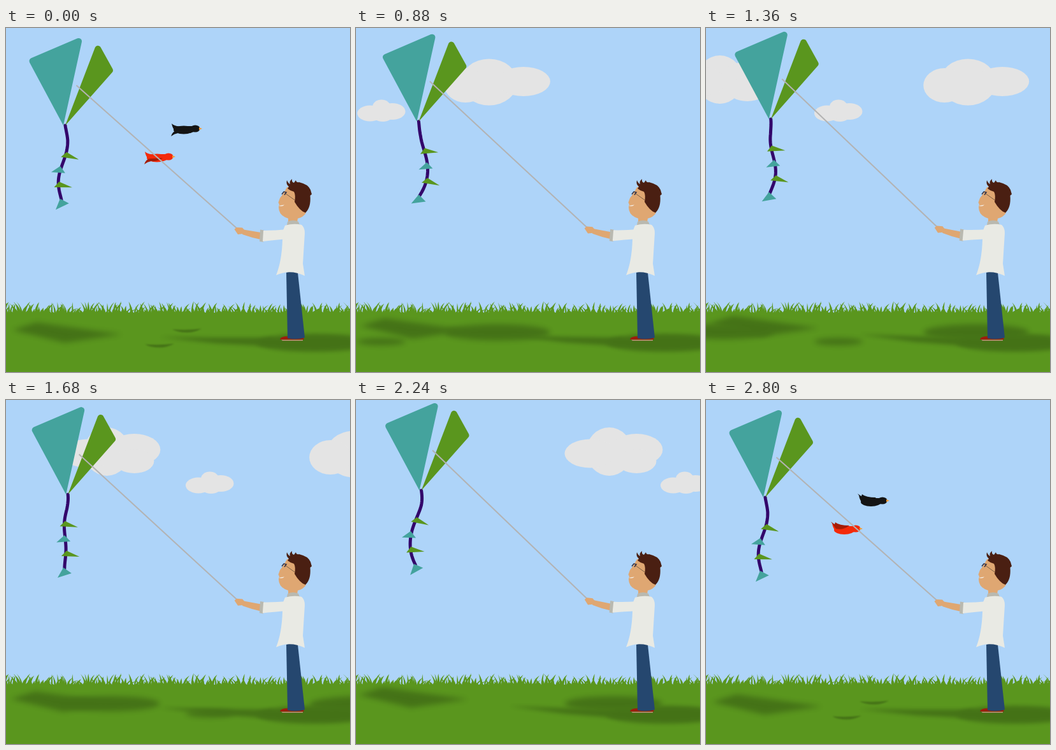
Recreate the animation shown at these times as an HTML page with a canvas. Size 540 px wide and 540 px high, loop 2880 ms.

```html
<!DOCTYPE html>
<html lang="en">
<head>
<meta charset="utf-8">
<title>Kite flying</title>
<style>
html, body { margin: 0; width: 100%; height: 100%; overflow: hidden; background: #aed4f9; }
canvas { display: block; width: 540px; height: 540px; }
</style>
</head>
<body>
<canvas id="stage" width="540" height="540"></canvas>
<script>
const SIZE = 540, LOOP = 2880, STEP = 80, CYCLE = 2800, BEAT = 560;
const SKY = '#aed4f9', GREEN = '#5a961e', TEAL = '#44a39d', CLOUD = '#e4e4e4';
const SKIN = '#dfa772', HAIR = '#4a1f12', SHIRT = '#e9eae4', CUFF = '#b9b9b0';

const screen = document.getElementById('stage').getContext('2d');
const layer = document.createElement('canvas');
layer.width = layer.height = SIZE;
const shade = layer.getContext('2d');
let ctx = screen;

function fillPath(d, color) {
  ctx.fillStyle = color;
  ctx.fill(new Path2D(d));
}

function line(d, color, width) {
  ctx.strokeStyle = color;
  ctx.lineWidth = width;
  ctx.stroke(new Path2D(d));
}

function oval(x, y, rx, ry, color) {
  ctx.fillStyle = color;
  ctx.beginPath();
  ctx.ellipse(x, y, rx, ry, 0, 0, 2 * Math.PI);
  ctx.fill();
}

function at(x, y, angle, draw) {
  ctx.save();
  ctx.translate(x, y);
  ctx.rotate(angle);
  draw();
  ctx.restore();
}

const smooth = f => f * f * (3 - 2 * f);

// Height of the kite on each beat; it drifts sideways in proportion
const RISE = [0, 5, -13.5, -4.8, -11, 0];

function drift(t) {
  const p = t % CYCLE / BEAT, i = Math.floor(p);
  const dy = RISE[i] + (RISE[i + 1] - RISE[i]) * smooth(p - i);
  return [-.87 * dy, dy];
}

// A wave runs down the tail: s is the depth from 0 to 1
function sway(s, t) {
  const phase = 2 * Math.PI * t / CYCLE - 2.15 * Math.sin(2 * s);
  return (3 - 7 * s) * Math.min(1, 5 * s) + 16 * Math.sin(2.8 * s ** 1.6) * Math.cos(phase);
}

function tail(t) {
  const node = i => ({ x: sway(i / 5, t), y: 23.3 * i });
  ctx.beginPath();
  for (let i = 0; i <= 5; i += .125) ctx.lineTo(node(i).x, node(i).y);
  ctx.strokeStyle = '#33066b';
  ctx.lineWidth = 5;
  ctx.lineCap = ctx.lineJoin = 'round';
  ctx.stroke();
  for (let i = 2; i <= 5; i++) {
    const { x, y } = node(i), a = node(i - 1), b = node(Math.min(5, i + 1));
    const tilt = .5 * Math.atan2(a.x - b.x, b.y - a.y);
    if (i % 2) {
      const end = i === 5;
      at(x, y + (end ? 1 : 0), tilt - (end ? .3 : 0), () =>
        fillPath(end ? 'M-14 10L-1 -3L9 9Z' : 'M-14 5L-1 -6L8 4Z', TEAL));
    } else {
      at(x, y, tilt + .2, () => fillPath('M-6 5L0 -5L22 0Z', GREEN));
    }
  }
}

function sail(x1, y1, x2, y2, x3, y3, color) {
  ctx.beginPath();
  ctx.moveTo(x3, y3);
  ctx.arcTo(x1, y1, x2, y2, 5);
  ctx.arcTo(x2, y2, x3, y3, 5);
  ctx.fillStyle = color;
  ctx.fill();
}

function kite(t, dx, dy) {
  at(dx, dy, 0, () => {
    at(93, 153, 0, () => tail(t));
    sail(34.5, 49.5, 121, 12.5, 90, 153, TEAL);
    sail(143.5, 21, 169, 67, 93, 153, GREEN);
  });
  line(`M${110.5 + dx} ${90 + dy}L363 ${315 + dy * .25}`, '#b3b3b3', 2);
}

// Puffs are [x, y, rx, ry] from the left edge of the cloud
const CLOUDS = [
  { x: -232, speed: .4215, width: 166, puffs: [[70, 85, 44.5, 36.5], [33, 90, 33, 27], [124, 84, 42, 23]] },
  { x: -629, speed: .427, width: 153, puffs: [[70, 81, 36, 38], [40, 84, 40, 22.5], [113, 78, 41, 25], [113, 96, 31, 19]] },
  { x: -306, speed: .35, width: 76, puffs: [[40, 137, 16, 10], [20, 134, 20, 12.5], [38, 123.5, 14, 11], [55, 131, 20.5, 13]] }
];

function cloud({ x, speed, puffs }, t) {
  for (const [px, py, rx, ry] of puffs) oval(x + speed * t + px, py, rx, ry, CLOUD);
}

function cloudShadow({ x, speed, width, puffs }, t) {
  oval(x + speed * t + width / 2, 454 + .28 * puffs[0][1], width / 2, width / 13, '#000');
}

// Birds slow down mid-screen, then speed away
function flight(t) {
  const s = t > LOOP / 2 ? t - LOOP : t;
  return .217 * s + (s < 0 ? -.000414 : .0008) * s * s;
}

function bird(x, y, up, body, wing) {
  at(x, y, 0, () => {
    oval(-18, 2, 16, up ? 7 : 6.5, body);
    oval(0, 0, 7.5, 5.5, body);
    fillPath('M-14 -4L0 -4V4L-8 7Z', body);
    fillPath('M-37 -8Q-32 -3 -22 -4L-22 7Q-34 7 -37 -8Z', body);
    fillPath(up ? 'M-39 -11Q-35 -8 -33 -7L-32 -10Q-26 -5 -10 -5Q-20 3 -31 0Z'
      : 'M-38 12Q-35 2 -26 3L-9 2Q-17 8 -27 7Q-33 8 -38 12Z', wing);
    fillPath('M6 -2L11 0L6 2Z', '#f59a32');
  });
}

function castShadows(t, dx, dy) {
  ctx = shade;
  ctx.clearRect(0, 0, SIZE, SIZE);
  ctx.filter = 'blur(4px)';
  at(-.6 * dx, dy, 0, () => fillPath('M10 474L48 462L182 481L92 494Z', '#000'));
  for (const c of CLOUDS) cloudShadow(c, t);
  ctx.filter = 'blur(3px)';
  oval(485, 494, 92, 14, '#000');
  fillPath(`M240 ${485 + dy * .4}L330 ${486 + dy * .2}L420 486V500L330 ${495 + dy * .2}Z`, '#000');
  ctx.filter = 'blur(1px)';
  for (const [x, y] of [[284, 474], [241, 497.5]])
    at(x + flight(t), y, 0, () => fillPath('M-23 -1Q0 1 23 -2Q12 4 0 4Q-14 4 -23 -1Z', '#000'));
  ctx.filter = 'none';
  ctx = screen;
  ctx.globalAlpha = .23;
  ctx.drawImage(layer, 0, 0);
  ctx.globalAlpha = 1;
}

// Seeded, so the blades never change
function makeGrass() {
  let seed = 41;
  const rnd = () => (seed = seed * 16807 % 2147483647) / 2147483647;
  const path = new Path2D();
  path.rect(0, 447, SIZE, SIZE);
  for (let x = -8; x < SIZE + 8; x += 2.5) {
    const h = 7 + 13 * rnd(), lean = (rnd() - .5) * 22, w = 1.2 + rnd();
    path.moveTo(x - w, 449);
    path.quadraticCurveTo(x - w, 449 - h * .6, x + lean, 449 - h);
    path.quadraticCurveTo(x + w, 449 - h * .5, x + w, 449);
    path.closePath();
  }
  return path;
}
const grass = makeGrass();

function man(dy) {
  // Legs
  fillPath('M430 489Q431 484 442 484L466 485L468 489Z', '#9c1d0c');
  fillPath('M432 489.5H466V491H434Z', '#c98a78');
  fillPath('M440 384Q449 380 458 384L469 486Q456 490 442 487Z', '#25476f');
  // Head
  fillPath('M441 250Q435 261 430 267L427.5 274L429 277L428 281Q428 292 438 297L443 299V305H457L458 299Q467 297 471 290L458 262L452 248Z', SKIN);
  fillPath('M442 252L444 249Q439 245 441 239Q443 244 446 245Q444 241 449 237Q448 242 452 243L455 239Q456 243 460 242Q474 245 478 254L480 261L477.5 263Q479 282 470 290Q461 287 453 273Q455 262 452 257Q447 256 442 252Z', HAIR);
  fillPath('M428 279Q432 278 437 277.5Q434 281 428 279Z', '#f2ece4');
  line('M439 260L453 270', '#7b6045', 1);
  line('M433 261L436 257L440 258L437 262', '#333347', 1.5);
  // Shirt
  fillPath('M442 304Q451 300 459 304L461 309H441Z', CUFF);
  fillPath('M438 310Q452 306 464 309Q469 313 469 322L466 370L469 389Q446 378 424 388Q433 366 434 332V320Z', SHIRT);
  // Arm follows the pull of the string
  at(440, 324, -dy / 320, () => {
    ctx.translate(-440, -324);
    fillPath('M373 316.5L400 321V332Q385 329 371 324Z', SKIN);
    fillPath('M358.5 316L362 313L371 313.5L375 318L372 323L364 324Z', SKIN);
    fillPath('M399 316.5L405 317.5L404 336L398 335Z', CUFF);
    fillPath('M404 318Q424 318 442 316V331Q420 333 403 335Z', SHIRT);
  });
}

function draw(t) {
  const [dx, dy] = drift(t), u = flight(t), up = t / STEP % 2 === 1;
  ctx.fillStyle = SKY;
  ctx.fillRect(0, 0, SIZE, SIZE);
  for (const c of CLOUDS) cloud(c, t);
  bird(297 + u, 158, up, '#151515', '#151515');
  bird(255 + u, 202, up, '#f42a0a', '#a51c06');
  ctx.fillStyle = GREEN;
  ctx.fill(grass);
  castShadows(t, dx, dy);
  kite(t, dx, dy);
  man(dy);
}

const start = performance.now();
let shown = -1;
function tick() {
  const t = Math.floor((performance.now() - start + 1) % LOOP / STEP) * STEP;
  if (t !== shown) draw(shown = t);
  requestAnimationFrame(tick);
}
tick();
</script>
</body>
</html>
```
